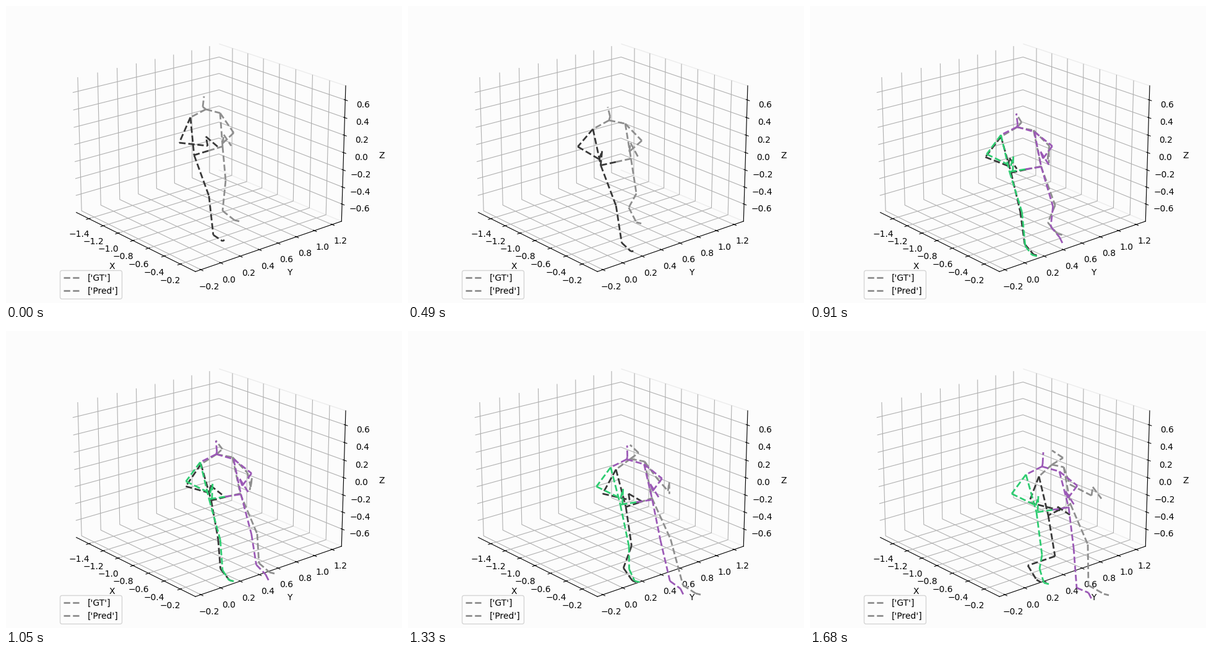
Write a matplotlib script that moves like this. It is 640 px wide and 480 px high and loops after 1.75 s.

```python
import numpy as np
import matplotlib.pyplot as plt
from matplotlib.animation import FuncAnimation
from matplotlib.lines import Line2D

W, H = 640, 480
FRAMES, STEP = 25, 70
FORECAST = 10  # first step with a predicted body
PAPER = "#fcfcfc"
GREY, DARK, PURPLE, GREEN = "#8e8e8e", "#383838", "#9b59b6", "#2ecc71"

PARENT = dict(shoulder="neck", elbow="shoulder", wrist="elbow", palm="wrist",
              finger="palm", hip="shoulder", knee="hip", ankle="knee",
              ball="ankle", toe="ball")


def swing(*keys):
    """Smooth curve through evenly spaced keys, as a function of u in 0..1."""
    pts = np.array(keys if len(keys) > 1 else keys * 2, float)
    slopes = np.gradient(pts, axis=0)
    last = len(pts) - 1

    def at(u):
        i = min(int(u * last), last - 1)
        s = u * last - i
        return (pts[i] + (pts[i + 1] - pts[i]) * s * s * (3 - 2 * s)
                + slopes[i] * s * (1 - s) ** 2 + slopes[i + 1] * s * s * (s - 1))

    return at


# Each joint swings around its parent; offsets are in pixels.
true_body = dict(
    head=dict(
        neck=swing((323, 167), (326, 187), (344, 201), (391, 216)),
        face=swing((-5, -4), (18, -11)),
        crown=swing((2, -17), (-18, -12))),
    left=dict(
        shoulder=swing((23, 6), (27, 5), (19, 4)),
        elbow=swing((22, 32), (27, 27), (23, 25), (10, 28)),
        wrist=swing((-18, 17), (-19, 18), (9, 23), (35, 18)),
        palm=swing((2, -14)),
        finger=swing((12, 18), (11, 22), (-4, 19), (14, 19)),
        hip=swing((4, 54), (12, 58), (11, 60)),
        knee=swing((5, 55), (10, 57), (29, 66), (28, 65)),
        ankle=swing((-5, 49), (-11, 25), (-16, 22), (20, 72), (1, 66)),
        ball=swing((19, 15), (12, 24), (18, 14), (25, 14)),
        toe=swing((8, 2))),
    right=dict(
        shoulder=swing((-25, 13), (-26, 15), (-21, 19)),
        elbow=swing((-18, 41), (-25, 28), (-24, 37), (-16, 42)),
        wrist=swing((46, 5), (34, 21), (40, 10), (50, 13)),
        palm=swing((-3, -15), (5, -13), (0, -12), (-4, -6)),
        finger=swing((21, 18), (-3, 23), (21, 14), (20, 13)),
        hip=swing((6, 61), (16, 58), (15, 63)),
        knee=swing((24, 66), (24, 65), (10, 62), (11, 66)),
        ankle=swing((7, 63), (9, 59), (1, 46), (-44, 15)),
        ball=swing((15, 10), (14, 23)),
        toe=swing((3, -2), (7, 4))))

# The forecast keeps a rigid upper body and only walks.
pred_body = dict(
    head=dict(
        neck=swing((327, 190), (346, 203), (375, 219)),
        face=swing((1, -4)),
        crown=swing((-3, -17), (1, -19))),
    left=dict(
        shoulder=swing((28, 8)),
        elbow=swing((29, 23)),
        wrist=swing((-15, 20)),
        palm=swing((-4, -11)),
        finger=swing((14, 22)),
        hip=swing((10, 56), (15, 58)),
        knee=swing((22, 64), (8, 65)),
        ankle=swing((-22, 5), (15, 62), (5, 65)),
        ball=swing((13, 20), (19, 8)),
        toe=swing((5, 10))),
    right=dict(
        shoulder=swing((-26, 13)),
        elbow=swing((-23, 31)),
        wrist=swing((39, 19)),
        palm=swing((4, -15)),
        finger=swing((-1, 24)),
        hip=swing((13, 59), (17, 61)),
        knee=swing((23, 64), (9, 69)),
        ankle=swing((8, 64), (-4, 22)),
        ball=swing((12, 12), (7, 23)),
        toe=swing((8, 2))))


def bones(body, u):
    """Segments of the left side with the head, then of the right side."""
    neck, face, crown = np.cumsum([part(u) for part in body["head"].values()], axis=0)
    sides = []
    for side in ("left", "right"):
        joints = dict(neck=neck)
        for name, parent in PARENT.items():
            joints[name] = joints[parent] + body[side][name](u)
        sides.append(joints)
    pelvis = (sides[0]["hip"] + sides[1]["hip"]) / 2
    left, right = [
        [(pelvis, j["hip"])] + [(j[parent], j[name]) for name, parent in PARENT.items()
                                if name != "shoulder"]
        for j in sides]
    left += [(neck, j["shoulder"]) for j in sides]
    left += [(neck, face), (face, crown)]
    return left, right


fig = plt.figure(figsize=(W / 100, H / 100), dpi=100, facecolor=PAPER)

# Room with grid
room = fig.add_axes([0, 0, 1, 1], projection="3d", facecolor=PAPER)
room.view_init(elev=20, azim=-40)
room.set(xlabel="X", ylabel="Y", zlabel="Z",
         xticks=np.arange(-7, 0) / 5,
         yticks=np.arange(-1, 7) / 5,
         zticks=np.arange(-3, 4) / 5)
reach = 0.75 * 25 / 24
for set_lim, mid in ((room.set_xlim, -0.797), (room.set_ylim, 0.527), (room.set_zlim, -0.022)):
    set_lim(mid - reach, mid + reach)
room.xaxis.pane.set_visible(False)
room.zaxis.pane.set_visible(False)
room.yaxis.pane.set(fill=False, edgecolor="#ececec", alpha=1)


def dashed(color):
    return Line2D([], [], color=color, lw=2, ls="--")


room.legend([dashed(GREY), dashed(GREY)], ["['GT']", "['Pred']"],
            loc="lower left", facecolor=PAPER)

# Flat layer in pixels for the bodies
layer = fig.add_axes([0, 0, 1, 1])
layer.set(xlim=(0, W), ylim=(H, 0))
layer.axis("off")


def make_lines(body, *colors):
    return [layer.add_line(dashed(color))
            for color, side in zip(colors, bones(body, 0)) for _ in side]


true_lines = make_lines(true_body, GREY, DARK)
pred_lines = make_lines(pred_body, PURPLE, GREEN)


def pose(lines, body, start, t):
    """Show a body whose motion runs from step start to the last step."""
    shown = t >= start
    u = max(t - start, 0) / (FRAMES - 1 - start)
    left, right = bones(body, u)
    for line, (a, b) in zip(lines, left + right):
        line.set_data([a[0], b[0]], [a[1], b[1]])
        line.set_visible(shown)


def update(t):
    pose(true_lines, true_body, 0, t)
    pose(pred_lines, pred_body, FORECAST, t)
    return true_lines + pred_lines


anim = FuncAnimation(fig, update, frames=FRAMES, interval=STEP,
                     init_func=lambda: update(0), repeat=True, repeat_delay=0)
plt.show()
```
